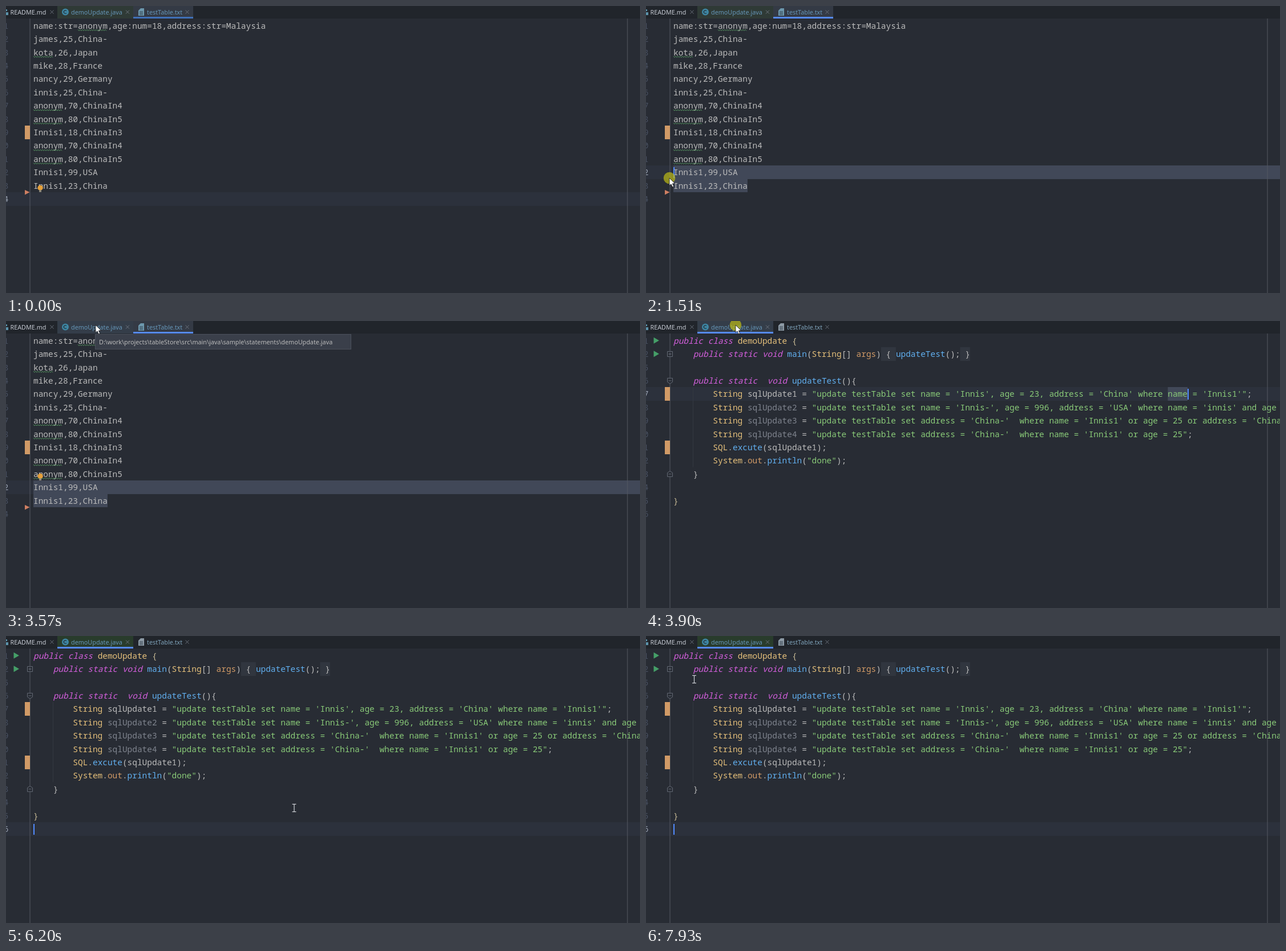
Animation of 1111x504 px, one loop 8 s. Source, as an HTML page with a canvas:

```html
<!DOCTYPE html>
<html lang="en">
<head>
<meta charset="utf-8">
<title>Editor session</title>
<style>
  html, body { margin: 0; width: 100%; height: 100%; overflow: hidden; background: #282c34; }
  canvas { display: block; }
</style>
</head>
<body>
<canvas id="stage" width="1111" height="504"></canvas>
<script>
const ctx = document.getElementById('stage').getContext('2d');
const W = 1111, H = 504, LOOP = 8000;
const LEFT = 48, CHAR = 8.664, ROW = 23.42, TOP = 22.8;
const TICK = 66, BLINK = 1025, SWITCH = 3900, DRAG_END = 1510;
const MONO = '14.44px "Noto Sans Mono", "DejaVu Sans Mono", monospace';
const UI = '10.8px "Noto Sans", "Open Sans", sans-serif';

const C = {
  bg: '#282c34', bar: '#21252b', line: '#545962', caretRow: '#2c313c', select: '#414858',
  text: '#bbbbbb', dim: '#495162', keyword: '#d55fde', string: '#89ca78', type: '#e5c07b',
  call: '#61afef', param: '#d19a66', unused: '#7f848e', brace: '#c6b995',
  caret: '#528bff', file: '#6596b8', close: '#6c737e', fold: '#636974'
};

const table = [
  'name:str=anonym,age:num=18,address:str=Malaysia',
  'james,25,China-', 'kota,26,Japan', 'mike,28,France', 'nancy,29,Germany', 'innis,25,China-',
  'anonym,70,ChinaIn4', 'anonym,80,ChinaIn5', 'Innis1,18,ChinaIn3',
  'anonym,70,ChinaIn4', 'anonym,80,ChinaIn5', 'Innis1,99,USA', 'Innis1,23,China', ''
];

const java = [
  'public class demoUpdate {',
  '    public static void main(String[] args) { updateTest(); }',
  '',
  '    public static  void updateTest(){',
  `        String sqlUpdate1 = "update testTable set name = 'Innis', age = 23, address = 'China' where name = 'Innis1'";`,
  `        String sqlUpdate2 = "update testTable set name = 'Innis-', age = 996, address = 'USA' where name = 'innis' and age = 25";`,
  `        String sqlUpdate3 = "update testTable set address = 'China-'  where name = 'Innis1' or age = 25 or address = 'China'";`,
  `        String sqlUpdate4 = "update testTable set address = 'China-'  where name = 'Innis1' or age = 25";`,
  '        SQL.excute(sqlUpdate1);',
  '        System.out.println("done");',
  '    }', '', '}', ''
];

const styles = [
  [/^"/, C.string],
  [/^(public|class|static|void)$/, C.keyword],
  [/^(demoUpdate|String|SQL|System)$/, C.type],
  [/^(main|updateTest|excute|println)$/, C.call],
  [/^(args|out)$/, C.param],
  [/^sqlUpdate[2-4]$/, C.unused]
];

// Where the pointer goes: start, end, x, y.
const moves = [
  [200, 270, 710, 345], [540, 730, 366, 328], [950, 950, 240, 316], [1020, DRAG_END, 41, 302],
  [1580, 1710, 38.5, 298.5], [2100, 2170, 180, 99], [2510, 2840, 157, 7],
  [4370, 4440, 514.5, 334], [5370, 5440, 893, 490], [5770, 6200, 505, 302],
  [6410, 6530, 180, 97], [6800, 7120, 702, 347], [7330, 7400, 542, 210],
  [7590, 7660, 183, 134], [7850, 7930, 84.5, 76]
];
const clicks = [
  { down: 950, up: 1910, blink: 2025 },
  { down: SWITCH, up: 4100, blink: SWITCH },
  { down: 4780, up: 5100, blink: 4850 }
];

const clamp = (v, lo, hi) => Math.max(lo, Math.min(hi, v));
const easeOut = f => f * (2 - f);
const rowTop = i => TOP + ROW * i;
const rowPx = i => Math.round(rowTop(i));
const colX = c => LEFT + CHAR * c;
const lastClick = t => clicks.filter(c => t >= c.down).pop();

function rect(x, y, w, h, color) {
  ctx.fillStyle = color;
  ctx.fillRect(x, y, w, h);
}

const band = (row, from, to, color) =>
  rect(from, rowPx(row), to - from, rowPx(row + 1) - rowPx(row), color);

function poly(color, ...p) {
  ctx.beginPath();
  p.forEach(([x, y]) => ctx.lineTo(x, y));
  ctx.closePath();
  ctx.fillStyle = color;
  ctx.fill();
}

function path(color, width, ...p) {
  ctx.beginPath();
  p.forEach(([x, y]) => ctx.lineTo(x, y));
  ctx.strokeStyle = color;
  ctx.lineWidth = width;
  ctx.stroke();
}

function disc(x, y, r, color) {
  ctx.beginPath();
  ctx.arc(x, y, r, 0, Math.PI * 2);
  ctx.fillStyle = color;
  ctx.fill();
}

function write(s, x, y, color, font) {
  ctx.font = font;
  ctx.fillStyle = color;
  ctx.fillText(s, x, y);
}

const code = (s, row, col, color, slant = '') =>
  write(s, colX(col), rowTop(row) + 16.9, color, slant + MONO);

// The pointer eases out to each stop and is redrawn once per tick.
function pointerAt(t) {
  let x = 1534, y = 809;
  for (const [start, end, toX, toY] of moves) {
    if (t < start) break;
    const ticks = time => Math.floor((time - start) / TICK + .2) + 1;
    const e = easeOut(Math.min(1, ticks(t) / ticks(end)));
    x += (toX - x) * e;
    y += (toY - y) * e;
  }
  return { x, y };
}

// The dragged caret follows the pointer one tick late.
function dragCaret(t) {
  const p = pointerAt(Math.max(950, Math.min(t, DRAG_END) - 70));
  const row = Math.floor((p.y - TOP) / ROW);
  return { row, col: clamp(Math.round((p.x - LEFT) / CHAR), 0, table[row].length) };
}

function drawCaret(t, row, col) {
  const click = lastClick(t);
  if (!click) return;
  const phase = Math.max(0, t - click.blink) % BLINK;
  if (phase < BLINK / 2) rect(Math.round(colX(col)), rowPx(row) + 3, 2, 19, C.caret);
}

function drawNumbers(skipped, current) {
  ctx.textAlign = 'right';
  for (let i = 0; i < 14; i++) {
    const n = i + 1 + (i > 1 ? skipped : 0);
    write(n, 4.3, rowTop(i) + 16.9, i === current ? '#9aa2b1' : C.dim, MONO);
  }
  ctx.textAlign = 'left';
}

function drawTypo(s, row) {
  const typo = s.match(/anonym|kota/);
  if (!typo) return;
  const p = [], from = colX(typo.index), y = rowTop(row) + 19.6;
  for (let dx = 0; dx <= typo[0].length * CHAR; dx += 2) p.push([from + dx, y + (dx % 4 ? 1.1 : -1.1)]);
  path('#55935f', 1, ...p);
}

const changeMark = row => band(row, 33, 42, C.param);

function drawBulb(row) {
  const y = rowTop(row) - 8;
  disc(60, y, 4.6, '#e5a03a');
  rect(58, y + 4, 4, 3.5, '#8f8a7c');
}

function drawRules() {
  for (const x of [41.5, 1088.5]) rect(x, 22, 1, H, C.line);
}

function drawTable(t) {
  const caret = lastClick(t) ? dragCaret(t) : { row: 13, col: 0 };
  band(caret.row, 0, W, C.caretRow);
  for (let row = caret.row; row < 13; row++) {
    const from = row === caret.row ? caret.col : 0;
    band(row, colX(from), row < 12 ? W : colX(table[row].length), C.select);
  }
  drawRules();
  drawNumbers(0, caret.row);
  changeMark(8);
  poly('#cf7f62', [33, 323], [41.5, 327], [33, 331.5]);
  table.forEach((s, i) => {
    code(s, i, 0, C.text);
    drawTypo(s, i);
  });
  if (t < 950 || t >= 2580) drawBulb(caret.row);
  drawCaret(t, caret.row, caret.col);
}

// kind: 0 closed, 1 block start, -1 block end
function drawFold(row, kind) {
  const x = 42, y = rowTop(row) + 11.8, r = 4.5;
  const flat = y - r * (kind || 1), tip = y + r * (kind ? kind * .5 : 1);
  const box = [[x - r, flat], [x + r, flat], [x + r, tip], [x, tip + kind * 3], [x - r, tip]];
  poly(C.bg, ...box);
  path(C.fold, 1, ...box, box[0]);
  path(C.fold, 1, [x - 2.5, y], [x + 2.5, y]);
  if (!kind) path(C.fold, 1, [x, y - 2.5], [x, y + 2.5]);
}

function drawJavaRow(s, row) {
  let col = 0;
  for (const part of s.match(/"[^"]*"|\w+|[^\w"]+/g) || []) {
    const hit = styles.find(([re]) => re.test(part));
    const plain = row === 0 || row === 12 ? C.brace : C.text;
    const color = hit ? hit[1] : plain;
    code(part, row, col, color, color === C.keyword ? 'italic ' : '');
    col += part.length;
  }
}

function drawJava(t) {
  const onName = t < 4780;
  const caret = onName ? { row: 4, col: 104 } : { row: 13, col: 0 };
  band(caret.row, 0, W, C.caretRow);
  if (onName) band(4, colX(100), colX(104), C.select);
  band(1, colX(42), colX(45), '#31363f');
  band(1, colX(58), colX(60), '#31363f');
  rect(82, rowPx(4), 1, ROW * 6, '#343941');
  drawRules();
  drawNumbers(2, caret.row);
  [4, 8].forEach(changeMark);
  for (const i of [0, 1]) {
    const y = rowTop(i) + 11.5;
    poly('#459f68', [13.5, y - 5.5], [23, y], [13.5, y + 5.5]);
  }
  drawFold(1, 0);
  drawFold(3, 1);
  drawFold(10, -1);
  java.forEach(drawJavaRow);
  drawCaret(t, caret.row, caret.col);
}

function closeMark(x) {
  for (const d of [3, -3]) path(C.close, 1, [x - 3, 10.5 - d], [x + 3, 10.5 + d]);
}

function drawTabs(t, hover) {
  const onJava = t >= SWITCH;
  rect(0, 0, W, 22, C.bar);
  rect(90, 0, 133, 22, hover ? '#343d49' : onJava ? '#293c2c' : '#2f3a36');
  if (!onJava) rect(223, 0, 105, 22, '#343a45');
  rect(onJava ? 90 : 223, 19, onJava ? 133 : 105, 3, t < 950 ? '#4070b8' : '#568af2');

  rect(0, 6, 2, 3, '#5b93ab');
  rect(0, 11, 4, 5, '#5b93ab');
  write('README.md', 7.5, 14.8, '#c3c8d0', UI);

  disc(104, 10.5, 6, '#3e86a3');
  ctx.beginPath();
  ctx.arc(104, 10.5, 2.7, .8, 5.5);
  ctx.strokeStyle = '#24343d';
  ctx.lineWidth = 1.3;
  ctx.stroke();
  write('demoUpdate.java', 114, 14.8, C.file, UI);

  poly(onJava ? '#8d9aa5' : '#6d98ad', [236, 4], [242, 4], [242, 17], [232, 17], [232, 8]);
  for (let y = 9.5; y < 16; y += 2.5) rect(234, y, 6, 1, '#2b3944');
  write('testTable.txt', 247, 14.8, onJava ? '#7fa3ba' : C.file, UI);
  [80.5, 213, 317.5].forEach(closeMark);
}

function drawTooltip() {
  rect(156, 23, 449, 27, '#4b505b');
  rect(157, 24, 447, 25, '#3a3f4a');
  write('D:\\work\\projects\\tableStore\\src\\main\\java\\sample\\statements\\demoUpdate.java',
    163, 40.5, C.text, UI);
}

function drawPointer({ x, y }, down) {
  if (down) disc(x, y, 10.3, 'rgba(200,196,18,.65)');
  if (y < 23 || x < 42) {
    const p = [[0, 0], [0, 13.5], [3, 10.8], [5.2, 15.8], [7.6, 14.8], [5.4, 10], [9.5, 9.6]]
      .map(([dx, dy]) => [x + dx, y + dy]);
    poly('#ffffff', ...p);
    path('#15171b', .8, ...p, p[0]);
    return;
  }
  const color = '#d0d3d8';
  rect(x - .6, y - 6.5, 1.2, 13, color);
  for (const dy of [-7.2, 6]) rect(x - 3.4, y + dy, 6.8, 1.2, color);
}

function draw() {
  const t = performance.now() % LOOP;
  const pointer = pointerAt(t);
  const hover = pointer.y < 22 && pointer.x > 90 && pointer.x < 223;
  rect(0, 0, W, H, C.bg);
  if (t < SWITCH) drawTable(t); else drawJava(t);
  drawTabs(t, hover);
  if (t >= 3380 && t < SWITCH) drawTooltip();
  const click = lastClick(t);
  drawPointer(pointer, click && t < click.up);
  requestAnimationFrame(draw);
}
draw();
</script>
</body>
</html>
```
